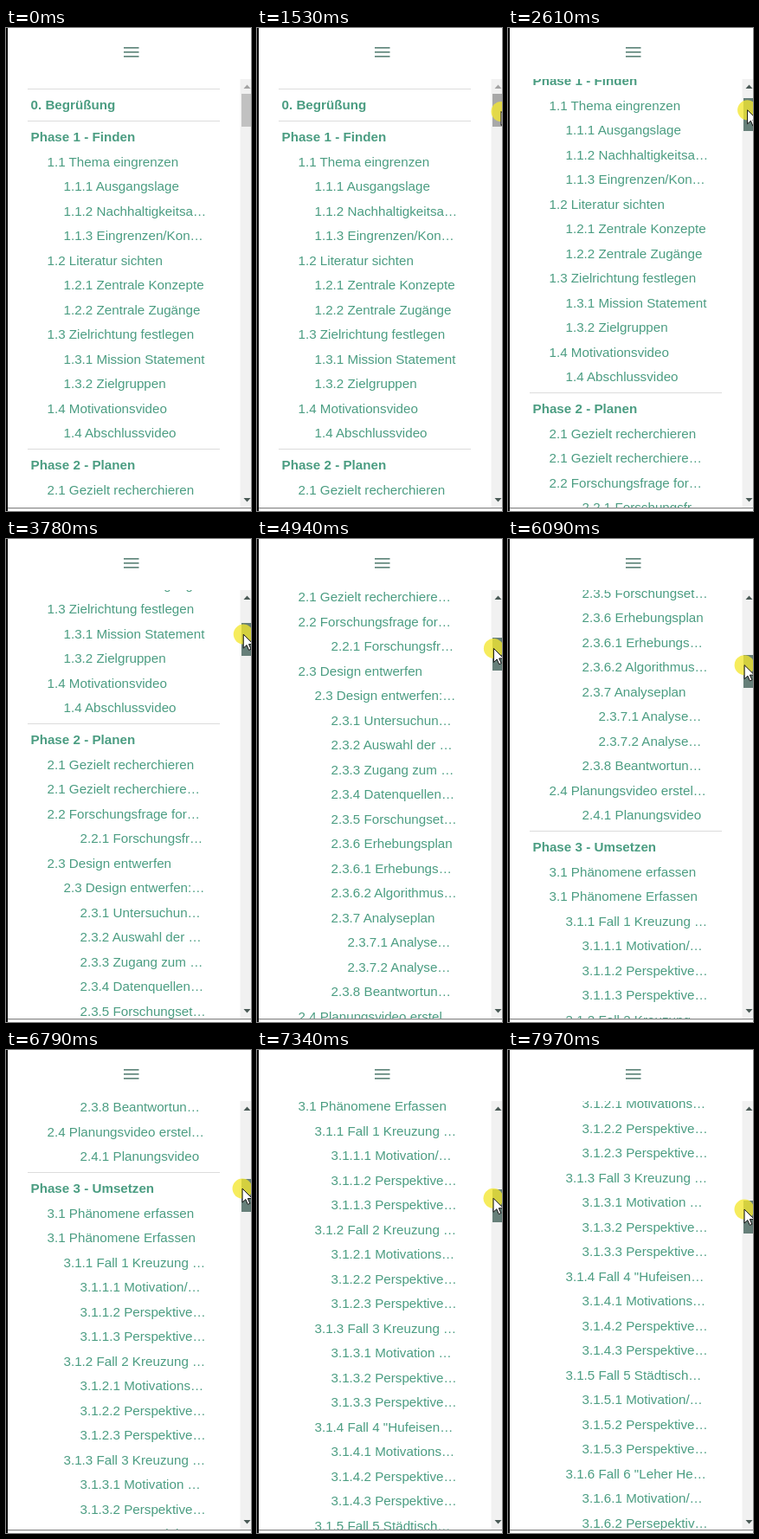
Animation of 283x558 px, one loop 8 s. Source, as an HTML page:

```html
<!DOCTYPE html>
<html lang="de">
<head>
<meta charset="utf-8">
<title>Inhaltsverzeichnis</title>
<style>
  html, body { margin: 0; width: 100%; height: 100%; overflow: hidden; background: #fff; }
  #stage { position: relative; width: 283px; height: 558px; overflow: hidden; background: #fff;
    font: 15.2px/28.5px "Liberation Sans", Arial, sans-serif; color: #4b9d82; }
  #view { position: absolute; left: 0; top: 59px; width: 270px; height: 495px; overflow: hidden; }
  #list { padding-top: 7.65px; }
  #list div { height: 28.5px; white-space: pre; }
  #list .head { margin: 3.75px 23px 0 25px; padding: 3.75px 0 0 3.5px; border-top: 1px solid #dcdcdc; font-weight: bold; }
  svg { position: absolute; left: 0; top: 0; }
</style>
</head>
<body>
<div id="stage">
  <div id="view"><div id="list"></div></div>
  <svg width="283" height="558" viewBox="0 0 283 558">
    <path d="M136 22.8h17.5m-17.5 5h17.5m-17.5 5h17.5" stroke="#658a80" stroke-width="1.7"/>
    <rect x="270.5" y="59" width="13" height="495" fill="#f1f1f1"/>
    <path id="up" d="M274.5 70h8l-4-4.5z"/>
    <path d="M274.5 543h8l-4 4.5z" fill="#4a5a56"/>
    <rect id="thumb" x="272" width="12" height="38"/>
    <rect x="2" y="554" width="281" height="1" fill="#8c8c8c"/>
    <rect x="2" y="555" width="281" height="1" fill="#dedede"/>
    <rect width="2" height="558" fill="#000"/>
    <g id="pointer">
      <circle r="11.5" fill="#f4e730" opacity=".78"/>
      <path d="M0 0V16L3.8 12.5L6.3 18.3L8.8 17.2L6.3 11.5H11.5Z" fill="#fff" stroke="#111"/>
    </g>
  </svg>
</div>
<script>
const LOOP = 8000, FRAME = 77.3, FIRST = 59;   // ms; the screen refreshes once per FRAME
const SCROLL_PER_PX = 13.04, INDENT = 19;
const HOVER = 16, PRESS = 24;                  // refreshes at which the thumb changes colour

// Leading spaces give the nesting level.
const toc = `0. Begrüßung
Phase 1 - Finden
 1.1 Thema eingrenzen
  1.1.1 Ausgangslage
  1.1.2 Nachhaltigkeitsa…
  1.1.3 Eingrenzen/Kon…
 1.2 Literatur sichten
  1.2.1 Zentrale Konzepte
  1.2.2 Zentrale Zugänge
 1.3 Zielrichtung festlegen
  1.3.1 Mission Statement
  1.3.2 Zielgruppen
 1.4 Motivationsvideo
  1.4 Abschlussvideo
Phase 2 - Planen
 2.1 Gezielt recherchieren
 2.1 Gezielt recherchiere…
 2.2 Forschungsfrage for…
   2.2.1 Forschungsfr…
 2.3 Design entwerfen
  2.3 Design entwerfen:…
   2.3.1 Untersuchun…
   2.3.2 Auswahl der …
   2.3.3 Zugang zum …
   2.3.4 Datenquellen…
   2.3.5 Forschungset…
   2.3.6 Erhebungsplan
   2.3.6.1 Erhebungs…
   2.3.6.2 Algorithmus…
   2.3.7 Analyseplan
    2.3.7.1 Analyse…
    2.3.7.2 Analyse…
   2.3.8 Beantwortun…
 2.4 Planungsvideo erstel…
   2.4.1 Planungsvideo
Phase 3 - Umsetzen
 3.1 Phänomene erfassen
 3.1 Phänomene Erfassen
  3.1.1 Fall 1 Kreuzung …
   3.1.1.1 Motivation/…
   3.1.1.2 Perspektive…
   3.1.1.3 Perspektive…
  3.1.2 Fall 2 Kreuzung …
   3.1.2.1 Motivations…
   3.1.2.2 Perspektive…
   3.1.2.3 Perspektive…
  3.1.3 Fall 3 Kreuzung …
   3.1.3.1 Motivation …
   3.1.3.2 Perspektive…
   3.1.3.3 Perspektive…
  3.1.4 Fall 4 "Hufeisen…
   3.1.4.1 Motivations…
   3.1.4.2 Perspektive…
   3.1.4.3 Perspektive…
  3.1.5 Fall 5 Städtisch…
   3.1.5.1 Motivation/…
   3.1.5.2 Perspektive…
   3.1.5.3 Perspektive…
  3.1.6 Fall 6 "Leher He…
   3.1.6.1 Motivation/…
   3.1.6.2 Persepektiv…`;

const $ = id => document.getElementById(id);

for (const line of toc.split('\n')) {
  const row = document.createElement('div');
  const level = line.search(/\S/);
  row.textContent = line.trim();
  if (level) row.style.paddingLeft = 28.5 + INDENT * level + 'px';
  else row.className = 'head';
  $('list').append(row);
}

// Key points: refresh number, then the values reached there.
const approach = [[0, 300, 560], [2, 288, 541], [3, 315, 530], [8, 290, 184], [16, 282, 96], [22, 282, 97], [24, 278, 90]];
const scrolling = [[26, 0], [33, 65], [36, 91], [40, 91], [48, 273], [63, 495], [78, 756], [87, 952], [102, 1278]];

function between(keys, frame) {
  const i = keys.findIndex(k => k[0] > frame);
  if (i < 0) return keys.at(-1).slice(1);
  if (i === 0) return keys[0].slice(1);
  const a = keys[i - 1], b = keys[i];
  const f = (frame - a[0]) / (b[0] - a[0]);
  return a.map((v, j) => v + (b[j] - v) * f).slice(1);
}

function draw(now) {
  const frame = Math.max(0, Math.floor((now % LOOP - FIRST) / FRAME));
  const [scroll] = between(scrolling, frame);
  const offset = scroll / SCROLL_PER_PX;
  // While dragging, the pointer follows the thumb and drifts a little to the left.
  const [x, y] = frame < PRESS ? between(approach, frame)
    : [273 + 5 * Math.exp(-offset / 15), 90 + 0.96 * offset];

  $('list').style.transform = `translateY(${-Math.round(scroll)}px)`;
  $('thumb').setAttribute('y', 76 + Math.round(offset));
  $('thumb').setAttribute('fill', frame >= PRESS ? '#667f79' : frame >= HOVER ? '#a8a8a8' : '#c1c1c1');
  $('up').setAttribute('fill', scroll ? '#4a5a56' : '#a3a3a3');
  $('pointer').setAttribute('transform', `translate(${x} ${y})`);
  requestAnimationFrame(draw);
}
draw(performance.now());
</script>
</body>
</html>
```
